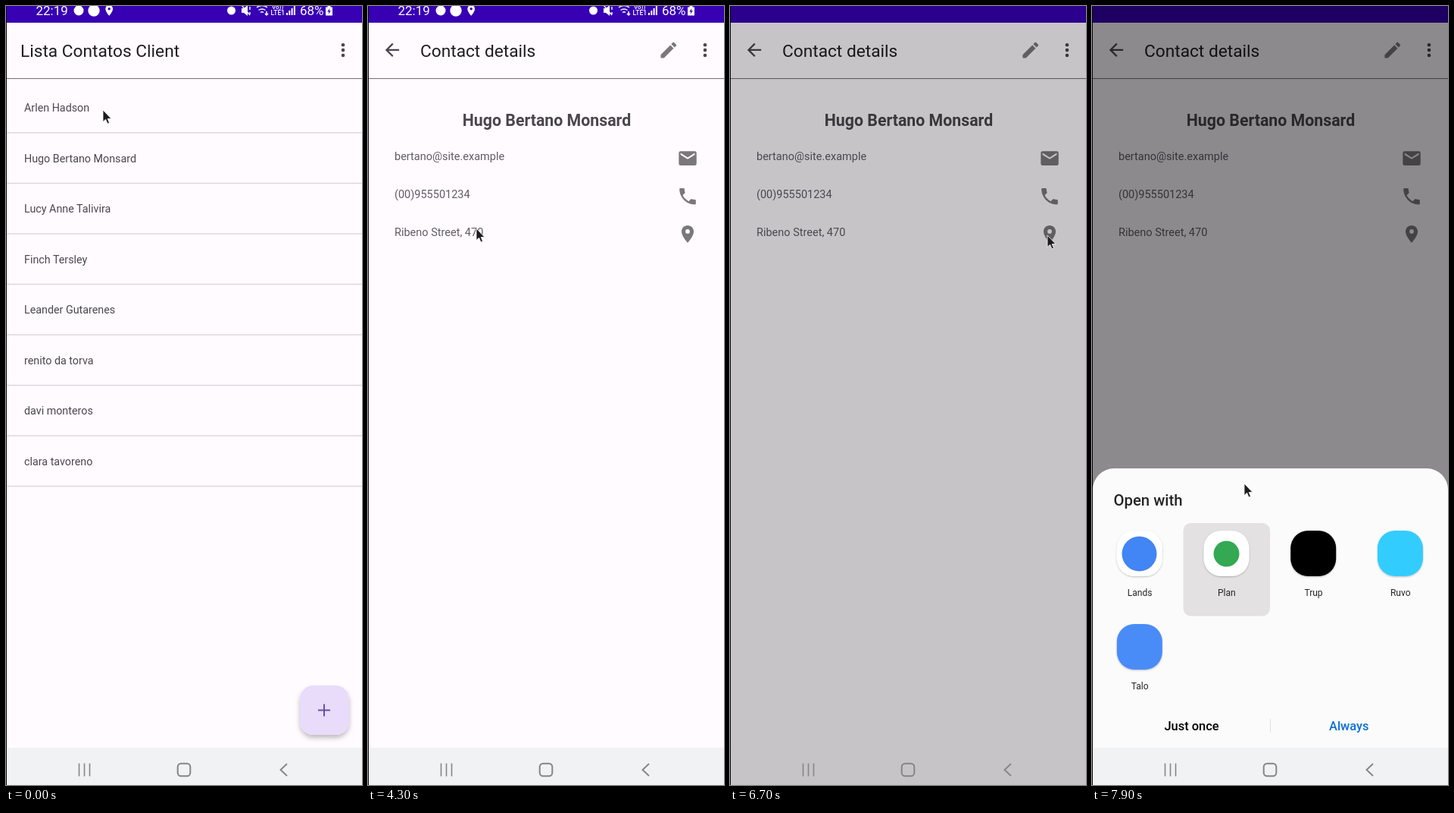
An HTML page for the animation above (8000 ms loop, 470 px wide and 1026 px high).

```html
<!DOCTYPE html>
<html lang="pt">
<head>
<meta charset="utf-8">
<title>Lista Contatos Client</title>
<style>
  html, body { margin: 0; width: 100%; height: 100%; overflow: hidden; background: #fffbff; }
  svg { display: block; width: 470px; height: 1026px; font-family: Roboto, sans-serif; }
  .title { font-size: 22.7px; fill: #1f1d20; }
  .row { font-size: 14.3px; fill: #4a474d; }
  .info { font-size: 14.5px; fill: #5f5c63; }
  .name { font-size: 21.3px; font-weight: 700; fill: #4a474c; text-anchor: middle; }
  .app { font-size: 12px; fill: #252525; text-anchor: middle; }
  .button { font-size: 16.4px; font-weight: 500; }
  .icon { fill: #7b787c; }
</style>
</head>
<body>
<svg viewBox="0 0 470 1026">
  <defs>
    <path id="pin" d="M12 2C8.1 2 5 5.1 5 9c0 5.3 7 13 7 13s7-7.7 7-13c0-3.9-3.1-7-7-7zm0 9.5a2.5 2.5 0 0 1 0-5 2.5 2.5 0 0 1 0 5z"/>
    <filter id="soft" x="-30%" y="-30%" width="160%" height="160%">
      <feDropShadow dx="0" dy="4" stdDeviation="3" flood-opacity=".25"/>
    </filter>
    <filter id="lift" x="-30%" y="-30%" width="160%" height="160%">
      <feDropShadow dx="0" dy="1" stdDeviation="1" flood-opacity=".25"/>
    </filter>
  </defs>

  <rect width="470" height="1026" fill="#fffbff"/>

  <g id="list">
    <text class="title" x="19" y="67">Lista Contatos Client</text>
    <g id="rows"></g>
    <rect x="388" y="895" width="65" height="65" rx="18" fill="#e8dcfa" filter="url(#soft)"/>
    <path d="M412 927.5h16M420 919.5v16" stroke="#6750a4" stroke-width="2"/>
  </g>

  <g id="details">
    <rect y="22" width="470" height="955" fill="#fffbff"/>
    <path transform="translate(18.3 44.3) scale(1.14)" fill="#4a474c" d="M20 11H7.8l5.6-5.6L12 4l-8 8 8 8 1.4-1.4L7.8 13H20z"/>
    <text class="title" x="69" y="67">Contact details</text>
    <path transform="translate(383 44.3) scale(1.15)" class="icon" d="M3 17.25V21h3.75L17.8 9.94l-3.75-3.75zM20.7 7.04a1 1 0 0 0 0-1.41l-2.34-2.34a1 1 0 0 0-1.41 0l-1.83 1.83 3.75 3.75z"/>
    <g id="progress">
      <rect x="1" y="96.5" width="469" height="4.5" fill="#eadcf5"/>
      <rect id="bar" y="96.5" height="4.5" fill="#4b10c8"/>
    </g>
    <g id="content">
      <text class="name" x="236" y="158">Hugo Bertano Monsard</text>
      <text class="info" x="35" y="203">bertano@site.example</text>
      <text class="info" x="35" y="252.5">(00)955501234</text>
      <text class="info" x="35" y="302.5">Ribeno Street, 470</text>
      <g class="icon">
        <path transform="translate(408 186.6) scale(1.17)" d="M20 4H4a2 2 0 0 0-2 2v12a2 2 0 0 0 2 2h16a2 2 0 0 0 2-2V6a2 2 0 0 0-2-2zm0 4-8 5-8-5V6l8 5 8-5z"/>
        <path transform="translate(407.6 236.3) scale(1.2)" d="M6.6 10.8c1.4 2.8 3.8 5.1 6.6 6.6l2.2-2.2c.3-.3.7-.4 1-.2 1.1.4 2.3.6 3.6.6.6 0 1 .4 1 1V20c0 .6-.4 1-1 1C10.6 21 3 13.4 3 4c0-.6.4-1 1-1h3.5c.6 0 1 .4 1 1 0 1.2.2 2.4.6 3.6.1.3 0 .7-.2 1z"/>
        <use href="#pin" transform="translate(408.2 286.6) scale(1.15)"/>
      </g>
    </g>
  </g>

  <g fill="#4a474c"><circle cx="445" cy="51.2" r="2.3"/><circle cx="445" cy="58.1" r="2.3"/><circle cx="445" cy="65" r="2.3"/></g>
  <path d="M0 95.6H470" stroke="#6c696f"/>
  <rect width="470" height="22" fill="#3700b3"/>

  <g id="status" fill="#fff">
    <text x="39.5" y="12" font-size="17">22:19</text>
    <circle cx="96" cy="6" r="6.5"/>
    <circle cx="116" cy="6" r="7.7"/>
    <use href="#pin" transform="translate(127.8 -2.5) scale(.7)"/>
    <circle cx="297.5" cy="6" r="5.5"/>
    <path d="M311 3h3l5-4v14l-5-4h-3z"/>
    <path d="M311-1l11 13M322 1v4m0 3v3" fill="none" stroke="#fff" stroke-width="1.4"/>
    <path d="M331 2q7-5 14 0M333.5 5.5q4.500-3 9 0M336 8.5q2-1.5 4 0M344 7v5m-2-2 2 2 2-2" fill="none" stroke="#fff" stroke-width="1.5"/>
    <text x="351" y="4" font-size="8" font-weight="500">Vo))</text>
    <text x="349.5" y="12" font-size="8.5" font-weight="500">LTE1</text>
    <path d="M370 9h2v3h-2zm3.300-3h2v6h-2zm3.300-3h2v9h-2zm3.300-4h2v13h-2z"/>
    <text x="388" y="12" font-size="17">68%</text>
    <path d="M422 1.5h2.500V0h4v1.500h2.500v11h-9z"/>
    <path d="M427.5 3l-3.200 4.500h2L425.500 11l3.300-4.800h-2z" fill="#3700b3"/>
  </g>

  <rect id="navBase" y="977" width="470" height="49" fill="#f1f2f3"/>
  <rect id="dim" width="470" height="1026"/>

  <g id="sheet">
    <path d="M1 1500V637a28 28 0 0 1 28-28H442a28 28 0 0 1 28 28V1500z" fill="#fcfbfb"/>
    <text x="28.5" y="658" font-size="20.3" font-weight="500" fill="#252525">Open with</text>
    <rect x="120.5" y="681" width="114.5" height="122.5" rx="10" fill="#e3e1e2"/>
    <g id="apps"></g>
    <circle cx="62.5" cy="721.5" r="23" fill="#4285f4"/>
    <circle cx="177.5" cy="721.5" r="17" fill="#34a853"/>
    <text class="button" x="95.5" y="954">Just once</text>
    <text class="button" x="313" y="954" fill="#0b6fd6">Always</text>
    <path d="M235.5 939v18" stroke="#dedede"/>
  </g>

  <rect id="navTop" y="977" width="470" height="49" fill="#f1f2f3"/>
  <g fill="none" stroke="#858487" stroke-width="1.6">
    <path d="M96.5 997.5v17M103.500 997.5v17M110.500 997.5v17"/>
    <rect x="226.700" y="997.700" width="16.600" height="16.600" rx="4.500" stroke-width="2"/>
    <path d="M371 998l-8.500 8 8.500 8" stroke-width="1.9"/>
  </g>
  <path d="M.5 0V1026" stroke="#0c0a0e"/>
  <path id="cursor" d="M0 0V15.500L3.600 12.300 6 18 8.500 17 6.200 11.500H11Z" fill="#1c1b1e" stroke="#fff" stroke-width=".8"/>
</svg>

<script>
const $ = id => document.getElementById(id);
const LOOP = 8000, STEP = 100;

const contacts = ["Arlen Hadson", "Hugo Bertano Monsard", "Lucy Anne Talivira", "Finch Tersley",
  "Leander Gutarenes", "renito da torva", "davi monteros", "clara tavoreno"];
$("rows").innerHTML = contacts.map((name, i) => {
  const y = 66.5 * i;
  return `<text class="row" x="24" y="${139.3 + y}">${name}</text>
    <path d="M1 ${167 + y}H470" stroke="#dcd8dd" stroke-width="1.3"/>`;
}).join("");

const apps = [["Lands", "#fff"], ["Plan", "#fff"], ["Trup", "#000"], ["Ruvo", "#33ccff"], ["Talo", "#4a8cf7"]];
$("apps").innerHTML = apps.map(([name, color], i) => {
  const x = 62.8 + 114.7 * (i % 4), y = 123 * Math.floor(i / 4);
  return `<rect x="${x - 30}" y="${691 + y}" width="60" height="60" rx="23" fill="${color}" filter="url(#lift)"/>
    <text class="app" x="${x + .3}" y="${776.5 + y}">${name}</text>`;
}).join("");

// Pointer path: time, x, y
const path = [
  [1000, 128, 137], [1500, 224, 253], [1700, 215, 286], [1900, 165, 258], [2000, 148, 240],
  [2400, 112, 208], [3800, 112, 208], [4300, 143, 293], [4700, 336, 311], [5300, 419, 302],
  [6900, 419, 302], [7900, 201, 629]
];

const clamp = v => Math.min(1, Math.max(0, v));

function pointer(t) {
  const i = path.findIndex(p => p[0] >= t);
  if (i < 1) return path[0].slice(1);
  const [a, b] = [path[i - 1], path[i]];
  const k = (t - a[0]) / (b[0] - a[0]);
  return [1, 2].map(n => a[n] + (b[n] - a[n]) * k);
}

function bezier(x1, y1, x2, y2, x) {
  const curve = (a, b, s) => 3 * a * s * (1 - s) ** 2 + 3 * b * s * s * (1 - s) + s ** 3;
  let lo = 0, hi = 1;
  for (let i = 0; i < 20; i++) {
    const mid = (lo + hi) / 2;
    if (curve(x1, x2, mid) < x) lo = mid; else hi = mid;
  }
  return curve(y1, y2, lo);
}

function show(id, opacity) {
  $(id).setAttribute("opacity", Number(opacity));
}

function draw(t) {
  show("details", t < 3000 ? 0 : t < 3100 ? .5 : 1);
  show("list", t < 3100);
  show("progress", t < 3900);
  show("content", t >= 3900);

  const run = t - 2982;
  const head = bezier(0, 0, .65, 1, clamp(run / 750));
  const tail = bezier(.1, 0, .45, 1, clamp((run - 333) / 850));
  $("bar").setAttribute("x", 1 + 469 * tail);
  $("bar").setAttribute("width", 469 * Math.max(0, head - tail));

  const dimmed = t >= 6700;
  show("dim", t >= 6900 ? .45 : dimmed ? .22 : 0);
  show("status", !dimmed);
  show("navBase", !dimmed);
  show("navTop", !dimmed || t >= 7200);

  show("sheet", t >= 6900);
  const rise = 338 * (1 - clamp((t - 6900) / 500)) ** 3;
  $("sheet").setAttribute("transform", `translate(0 ${rise})`);

  $("cursor").setAttribute("transform", `translate(${pointer(t)})`);
}

const start = performance.now();
function frame() {
  const t = (performance.now() - start) % LOOP;
  draw(Math.floor(t / STEP) * STEP);
  requestAnimationFrame(frame);
}
frame();
</script>
</body>
</html>
```
